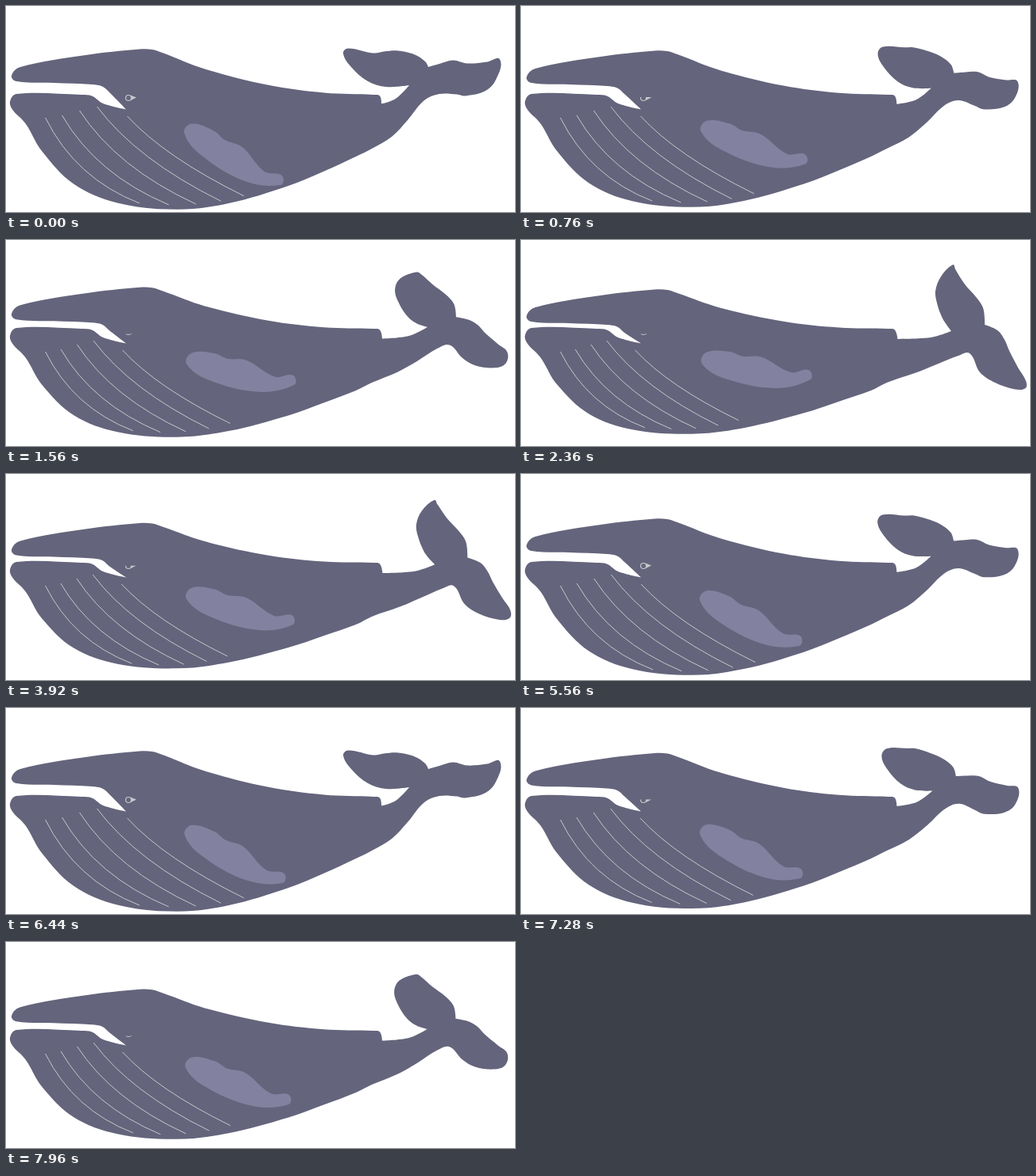
Write an HTML page that moves like this. It is 640 by 260 pixels and loops after 8000 ms.

```html
<!DOCTYPE html>
<html lang="en">
<head>
<meta charset="utf-8">
<title>Whale</title>
<style>
  html, body { margin: 0; width: 100%; height: 100%; overflow: hidden; background: #fff; }
  svg { display: block; width: 100vw; height: 100vh; }
  #skin { fill: #64647c; }
  #fin { fill: #82819f; }
  #grooves { fill: none; stroke: #c8c7ca; stroke-width: 1; }
  .ring { fill: #64647c; stroke: #c8c7ca; stroke-width: 1.2; }
  .glint { fill: #c8c7ca; }
</style>
</head>
<body>
<svg viewBox="0 0 640 260">
  <clipPath id="lid"><rect id="lidEdge" x="145" y="111" width="25" height="20"/></clipPath>
  <path id="skin"/>
  <path id="fin"/>
  <path id="grooves"/>
  <g clip-path="url(#lid)">
    <path class="glint" d="M157 112.8L164 115.6L157 119Z"/>
    <circle class="ring" cx="154" cy="116" r="3.5"/>
  </g>
</svg>
<script>
const LOOP = 8000, STROKE = 6420;
const $ = id => document.getElementById(id);

// Key points "x,y"; an exclamation mark makes a sharp corner.
const points = text => text.split(' ').map(item => {
  const [x, y] = item.split(',').map(parseFloat);
  return { x, y, sharp: item.endsWith('!') };
});

const back = points('130,109 121,101.5 108,99 60,97 13,95 7,88 18,77 100,62 168,54.5 184,55 '
  + '198,59.5 250,79.5 330,99.8 400,109.5 462,112 470,113.5');
const belly = points('460,180 440,190 400,208.5 355,227 280,249 215,256.8 140,248.5 85,224.5 '
  + '45,183 27,152 20,143 9,132 5,121');
const lip = points('13,111 95,112 108,113.5 122,123 151,130.5!');
const tailDown = points('472,123.5! 490,117 507,100! 478,102 455,95 434,77 424,60 430,53.5 462,59.5 '
  + '475,57.5 493,56.5 513,61 527,70 531,77! 545,73 562,68.5 580,72.5 605,70.5 621,67.5 616,93 '
  + '603,107 577,113.5 567,111.5 545,111 526,119 505,144 485,165');
const tailUp = points('473.5,125! 515,123 541,115! 535,107 529,97 523,80 521,64 528,46 543,31.3 '
  + '546,37 558,56 572,72 581,86 583,107! 599,114 608,126 614,140 625,161 635,178 634,187 '
  + '620,188 596,180 577,167 564,143 550,146 525,156 495,168');
const fin = points('224,160 234,148.5 262,158 275,169 297,178 325,209 347,214 345,226 '
  + '300,221 245,188');
const grooveTops = points('49.5,141 70.5,138 92.5,132 114.5,127 152.5,139');

const clamp = v => Math.min(1, Math.max(0, v));
const mix = (a, b, u) => a + (b - a) * u;
const smooth = u => u * u * (3 - 2 * u);

// Rises from 0 to 1 at the peak time, then falls back by the end of the stroke.
function wave(t, peak, bias = .85) {
  const s = t % STROKE;
  const u = s < peak ? s / peak : (STROKE - s) / (STROKE - peak);
  return smooth(u ** bias);
}

// The fin swings in a slower rhythm of its own after leaving its rest pose.
const finSwing = t => .555 + .445 * Math.cos(2 * Math.PI * (t - 2450) / 7800) - .38 * Math.exp(-t / 600);

const dip = (p, q) => ({ ...q, y: q.y + 8 * p * clamp((470 - q.x) / 270) ** 1.5 });
const lift = (p, q) => ({ ...q, y: q.y - 12.3 * p * Math.sin(Math.PI * clamp((q.x - 40) / 400)) ** .8 });
const bend = (p, q, i) => ({ ...q, x: mix(q.x, tailUp[i].x, p), y: mix(q.y, tailUp[i].y, p) });

function smoothPath(pts) {
  const n = pts.length;
  const tangent = i => {
    if (pts[i].sharp) return { x: 0, y: 0 };
    const a = pts[(i + n - 1) % n], b = pts[(i + 1) % n];
    const length = Math.hypot(b.x - a.x, b.y - a.y);
    return { x: (b.x - a.x) / length, y: (b.y - a.y) / length };
  };
  const spot = (q, m, reach) => `${(q.x + m.x * reach).toFixed(2)} ${(q.y + m.y * reach).toFixed(2)} `;
  let d = `M${pts[0].x} ${pts[0].y}`;
  pts.forEach((a, i) => {
    const j = (i + 1) % n, b = pts[j];
    const reach = Math.hypot(b.x - a.x, b.y - a.y) * .35;
    d += 'C' + spot(a, tangent(i), reach) + spot(b, tangent(j), -reach) + spot(b, b, 0);
  });
  return d + 'Z';
}

function groovePath(p) {
  return grooveTops.map((top, i) => {
    const x = top.x - 2.2 * i * p;
    const dx = 168 + 38 * i - 1.3 * i * i - (12 + 3.3 * i) * p - x;
    const dy = 249 + 3.3 * i - 1.4 * i * i - 12 * p - top.y;
    return `M${x} ${top.y}q${dx * .32} ${dy * (.71 - .05 * i)} ${dx} ${dy}`;
  }).join('');
}

function draw(t) {
  const p = 1.1 * wave(t, 3000);
  $('skin').setAttribute('d', smoothPath([
    ...back.map(q => dip(p, q)),
    ...tailDown.map((q, i) => bend(p, q, i)),
    ...belly.map(q => lift(p, q)),
    ...lip
  ]));
  $('grooves').setAttribute('d', groovePath(1.06 * wave(t, 2700, .93)));
  $('fin').setAttribute('transform', `rotate(${-20.5 * finSwing(t)} 215 148)`);
  $('lidEdge').setAttribute('y', 111 + 7.7 * wave(t, 1700));
}

$('fin').setAttribute('d', smoothPath(fin));
const start = performance.now();
function tick() {
  draw((performance.now() - start) % LOOP);
  requestAnimationFrame(tick);
}
tick();
</script>
</body>
</html>
```
